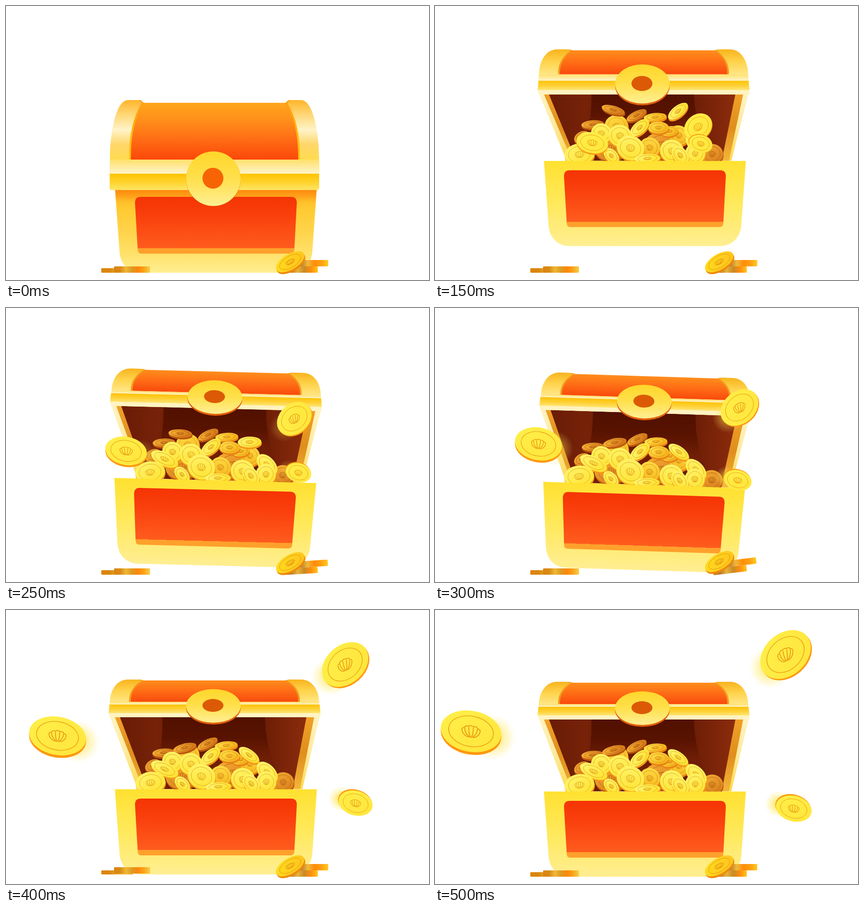
An HTML page with a canvas that plays this animation: 928x603 px, repeating every 1500 ms.

```html
<!DOCTYPE html>
<html lang="en">
<head>
<meta charset="utf-8">
<title>Treasure chest</title>
<style>
html, body { margin: 0; width: 100%; height: 100%; overflow: hidden; background: #fff; }
canvas { display: block; }
</style>
</head>
<body>
<canvas id="stage" width="928" height="603"></canvas>
<script>
const ctx = document.getElementById('stage').getContext('2d');
const LOOP = 1500;

// The picture holds for 100 ms, then advances every 50 ms up to step 9.
const KEYS = [0, 1, 2, 3, 5, 7, 9];
let step = 0;

function at(track) {
  if (typeof track === 'number') return track;
  let i = 0;
  while (i < KEYS.length - 2 && KEYS[i + 1] <= step) i++;
  const u = (step - KEYS[i]) / (KEYS[i + 1] - KEYS[i]);
  return track[i] + (track[i + 1] - track[i]) * u;
}

const CHEST = { dy: [0, -69.5, -58.5, -30, -10, -5, 0], rot: [0, -2.07, 0, 1.1, 1.8, 0, 0] };
const LID = {
  top: [207, 159, 154, 158, 158, 158, 158],
  panel: [338, 228, 209, 207, 207, 207, 207],
  gold: [369, 242, 223, 213, 213, 213, 213],
  lip: [405, 266, 243.5, 232, 232, 232, 232],
  inner: [405, 274, 253, 241, 241, 241, 241],
  badgeY: [380, 255, 230, 216, 216, 216, 216],
  badgeR: [60, 50, 43, 37, 37, 37, 37]
};
const HOP_RIGHT = [0, 0, 0, 0, 1, 0, 0];
const HOP_LEFT = [0, 0, 0, 0, 0, 1, 0];

const BRIGHT = ['#fff368', '#ffe333', '#dfa01c', '#f6971a'];
const MID = ['#ffdd45', '#f5b41c', '#d98a14', '#ec8415'];
const DARK = ['#f3a930', '#d67c1c', '#b4600f', '#bd580c'];
const GROUND = ['#ffd91c', '#ffc61e', '#e08d10', '#f08a0c'];
const FLYING = ['#ffee48', '#ffe63c', '#e99a14', '#ff980e'];

// x, y, rx, ry, rotation, tone
const PILE = [
  [398, 323, 26, 25, 0, MID],
  [346, 319, 25, 9, -4, DARK],
  [[392, 390, 391, 369, 393, 392, 392], [308, 300, 287, 288, 308, 308, 308], 26, 9,
    [0, 17, 15, 17, -13, -14, -14], DARK],
  [442, 299, 24, 9, -27, DARK],
  [483, 303, 25, 9, -5, MID],
  [385, 372, 35, 28, 0, DARK],
  [500, 365, 42, 30, 0, DARK],
  [322, 347, 18, 12, -30, DARK],
  [535, 343, 23, 21, 40, MID],
  [515, 334, 19, 11, -10, MID],
  [490, 326, 23, 13, 0, MID],
  [[533, 532, 533, 533, 534, 533, 533], [324, 310, 290, 302, 324, 324, 324], 26, 12,
    [0, -38, -38, -38, 33, 35, 35], BRIGHT],
  [608, 384, 24, 22, 0, DARK],
  [365, 339, 23, 22, 30, BRIGHT],
  [348, 355, 32, 15, 24, BRIGHT],
  [449, 326, 25, 13, -40, BRIGHT],
  [406, 344, 26, 24, 20, BRIGHT],
  [471, 370, 23, 22, 30, MID],
  [573, 362, 28, 17, 45, BRIGHT],
  [317, 385, 33, 24, -8, BRIGHT],
  [387, 388, 20, 13, 45, BRIGHT],
  [429, 371, 31, 27, 25, BRIGHT],
  [520, 378, 27, 25, 30, BRIGHT],
  [571, 383, 22, 23, 0, BRIGHT],
  [538, 387, 23, 16, 50, BRIGHT],
  [466, 394, 28, 10, -3, BRIGHT]
];

const FLYERS = [
  { x: [552, 552, 577, 597, 668, 744, 769], y: [278, 277, 266, 268, 219, 120, 98],
    rx: [30, 30, 33, 38, 46, 57, 62], ry: [25, 25, 27, 30, 35, 42, 46],
    rot: -42, rim: [.04, .05], glow: [-.55, .62] },
  { x: [369, 369, 345, 300, 227, 113, 79], y: [301, 301, 301, 330, 299, 277, 267],
    rx: [34, 34, 35, 40, 52, 63, 67], ry: [22, 22, 23, 26, 36, 42, 45],
    rot: 11, rim: [0, .09], glow: [.72, .3] },
  { x: [570, 570, 583, 619, 664, 767, 787], y: [310, 310, 303, 346, 379, 425, 437],
    rx: [24, 24, 26, 26, 31, 38, 40], ry: [20, 20, 19, 20, 22, 27, 28],
    rot: 16, rim: [-.03, -.07], glow: [-.85, -.35] }
];

function grad(x0, y0, x1, y1, colors) {
  const g = ctx.createLinearGradient(x0, y0, x1, y1);
  colors.forEach((c, i) => g.addColorStop(i / (colors.length - 1), c));
  return g;
}
const down = (y0, y1, ...colors) => grad(0, y0, 0, y1, colors);
const across = (x0, x1, ...colors) => grad(x0, 0, x1, 0, colors);

function fill(path, color) {
  ctx.fillStyle = color;
  ctx.fill(new Path2D(path));
}

function poly(color, ...p) {
  fill('M' + p.join(' ') + 'Z', color);
}

function oval(x, y, rx, ry, color, rot = 0) {
  ctx.fillStyle = color;
  ctx.beginPath();
  ctx.ellipse(x, y, rx, ry, rot, 0, 7);
  ctx.fill();
}

function bar(x, y, w, h, color, r = 2) {
  ctx.fillStyle = color;
  ctx.beginPath();
  ctx.roundRect(x, y, w, h, r);
  ctx.fill();
}

function inSpace(x, y, deg, draw) {
  ctx.save();
  ctx.translate(x, y);
  ctx.rotate(deg * Math.PI / 180);
  draw();
  ctx.restore();
}

// Scallop outline with ribs, inside a unit circle.
function shellPath() {
  const edge = i => {
    const a = Math.PI * (1.08 + i * .168);
    return [.31 * Math.cos(a), .06 + .31 * Math.sin(a)];
  };
  ctx.moveTo(-.11, .28);
  ctx.quadraticCurveTo(-.27, .2, ...edge(0));
  for (let i = 1; i <= 5; i++) {
    const [ax, ay] = edge(i - .5);
    ctx.quadraticCurveTo(ax * 1.2, ay * 1.25, ...edge(i));
  }
  ctx.quadraticCurveTo(.27, .2, .11, .28);
  ctx.closePath();
  for (let i = 1; i < 5; i++) {
    const [x, y] = edge(i);
    ctx.moveTo(x * .3, .26);
    ctx.quadraticCurveTo(x * .95, .1, x * .95, y * .85);
  }
}

function coin(x, y, rx, ry, rot, [light, shade, line, edge], rimX = 1, rimY = 4) {
  const angle = rot * Math.PI / 180;
  for (const u of [1, .5]) oval(x + rimX * u, y + rimY * u, rx, ry, edge, angle);
  inSpace(x, y, rot, () => {
    oval(0, 0, rx, ry, grad(-rx * .5, -ry, rx * .5, ry, [light, shade]));
    ctx.strokeStyle = line;
    ctx.lineWidth = Math.max(.8, rx / 46);
    ctx.beginPath();
    ctx.ellipse(0, 0, rx * .74, ry * .74, 0, 0, 7);
    ctx.stroke();
    ctx.save();
    ctx.beginPath();
    ctx.scale(rx, ry);
    ctx.rotate(-angle * .6);
    shellPath();
    ctx.restore();
    ctx.lineWidth = Math.max(1, rx / 34);
    ctx.stroke();
  });
}

function drawInside(lip, inner) {
  poly(down(lip, 399, '#fff4c4', '#ffeaa0', '#ffd84a'), 225, lip, 690, lip, 650, 399, 289, 399);
  poly(down(inner, 399, '#f0a028', '#e08e1c', '#f3b53a'), 239, inner, 676, inner, 645, 399, 301, 399);
  ctx.save();
  ctx.clip(new Path2D(`M250 ${inner}L659 ${inner}L629 399L310 399Z`));
  ctx.fillStyle = across(250, 659, '#6a1c06', '#762208', '#5c1503', '#5c1503', '#701f07', '#8c2c0c');
  ctx.fillRect(240, inner, 430, 399 - inner);
  fill(`M343 ${inner}L568 ${inner}Q570 310 595 360L330 360Q345 300 343 ${inner}Z`,
    down(inner, 330, '#521000', '#581300', '#701e06'));
  ctx.restore();
}

function drawLid(closed, top, panel, gold, lip, inner) {
  const h = panel - top;
  const notch = closed ? 6 : 2;
  const cap = `M228 ${panel}C228 ${panel - h * .42} 240 ${top} 268 ${top}L291 ${top}` +
    `L298 ${top + notch}Q269 ${top + h * .4} 270 ${panel}Z`;
  ctx.fillStyle = closed ? down(top, panel, '#ffa91c', '#ff8f1a', '#ff6c14', '#fb470a')
                         : down(top, panel, '#ff8f1c', '#ff6e16', '#f94a0c');
  ctx.fillRect(272, top + notch, 371, h - notch);
  const capColor = closed
    ? down(top, panel, '#ffb52a', '#ffd878', '#fff3c8', '#ffd668', '#ffdc50')
    : down(top, panel, '#f8b41e', '#ffd34c', '#ffe684');
  for (const side of [1, -1]) {
    ctx.save();
    if (side < 0) {
      ctx.translate(915, 0);
      ctx.scale(-1, 1);
    }
    ctx.save();
    ctx.translate(4, 0);
    ctx.clip(new Path2D(`M250 ${top}L300 ${top}L300 ${panel}L250 ${panel}Z`));
    fill(cap, closed ? down(top, panel, '#ff9a10', '#ffb60c', '#ffc410') : '#f39a1c');
    ctx.restore();
    fill(cap, capColor);
    ctx.restore();
  }
  poly(down(panel, gold, '#ffe06a', '#fff4cc'), 228, panel, 687, panel, 688, gold, 227, gold);
  if (closed) {
    bar(227.5, gold, 459.5, lip - gold, down(gold, lip, '#fdc400', '#ffd22a', '#ffe566'), [0, 0, 4, 4]);
  } else {
    poly(down(gold, lip, '#fcc308', '#ffd034', '#ffe574'), 227, gold, 688, gold, 690, lip, 225, lip);
    poly('#fff3c2', 225, lip, 690, lip, 689, inner, 228, inner);
  }
}

function drawBody(closed) {
  fill('M239 399.5L682 399.5L672 540C670 570 650 587 624 587L297 587C270 587 251 570 249 540Z',
    closed ? down(405, 587, '#ffb41e', '#ffcb34', '#ffd34a', '#ffe066', '#ffee92')
           : down(399, 587, '#ffe130', '#ffe95c', '#ffee92'));
  if (closed) poly(down(405, 434, '#ff8a0c', '#ff9c1acc', '#ffb41e00'), 239.5, 405, 681.5, 405, 679, 434, 241.5, 434);
  const red = ctx.createLinearGradient(0, 420, 0, 545);
  [[0, '#f53404'], [.3, '#f93e0c'], [.905, '#ff5c1e'], [.905, '#ffa02c'], [1, '#ffa02c']]
    .forEach(s => red.addColorStop(...s));
  fill('M296 420L625 420Q638 420 638 433L632.5 537Q632 545 624 545L297 545Q289.5 545 289 537L283 433Q283 420 296 420Z', red);
}

function drawBadge(closed, y, r) {
  oval(455, y + (closed ? 1 : 4), 60, r, closed ? '#dc6008' : '#e2600c');
  oval(455, y, 60, r, down(y - r, y + r, '#ffd62a', '#ffe04c', '#ffef94'));
  oval(454, y - 1, 23, 23 * r / 60, closed ? '#f76406' : '#dc5a06');
}

function drawChest() {
  const closed = step === 0;
  const [top, panel, gold, lip, inner, badgeY, badgeR] = Object.values(LID).map(at);
  inSpace(458, 350 + at(CHEST.dy), at(CHEST.rot), () => {
    ctx.translate(-458, -350);
    if (closed) {
      drawBody(closed);
    } else {
      drawInside(lip, inner);
      for (const [x, y, rx, ry, rot, tone] of PILE) coin(at(x), at(y), rx, ry, at(rot), tone);
    }
    drawLid(closed, top, panel, gold, lip, inner);
    drawBadge(closed, badgeY, badgeR);
    if (!closed) drawBody(closed);
  });
}

function drawGround() {
  const left = at(HOP_LEFT);
  const right = at(HOP_RIGHT);
  bar(209, 577 - 4 * left, 70, 10 - left, across(209, 279, '#e08408', '#d8860f', '#e8a828', '#f4bc30', '#ffa51c'));
  bar(237, 573 - 7 * left, 79, 14,
    across(237, 316, '#dc8410', '#d88a18', '#f0b834', '#dd9a24', '#ff8608', '#f9a41c', '#f6cf48'));
  inSpace(620, 580, -7 * right, () => {
    bar(-10, -7, 74, 14, across(-10, 64, '#d98a14', '#b8782c', '#e8b43c', '#c98a26', '#ff8e0c', '#ffc51c'));
    bar(12, -21, 75, 14, across(12, 87, '#d08a1c', '#b97c30', '#efb93a', '#ff8c0a', '#ffa010', '#ffcb22'));
  });
  coin(623.5, 563 - 5 * right, 35, 17, -31, GROUND, 2, 4);
}

function drawFlyers() {
  const glow = at([0, 0, 0, .1, .7, 1, 1]);
  for (const f of FLYERS) {
    const [x, y, rx, ry] = [f.x, f.y, f.rx, f.ry].map(at);
    const gx = x + f.glow[0] * rx, gy = y + f.glow[1] * ry, r = rx * .75;
    const g = ctx.createRadialGradient(gx, gy, 0, gx, gy, r);
    g.addColorStop(0, `rgba(255,225,50,${.9 * glow})`);
    g.addColorStop(.5, `rgba(255,230,80,${.45 * glow})`);
    g.addColorStop(1, 'rgba(255,235,120,0)');
    oval(gx, gy, r, r, g);
    coin(x, y, rx, ry, f.rot, FLYING, f.rim[0] * rx, f.rim[1] * rx);
  }
}

function frame(now) {
  const t = now % LOOP;
  step = t < 100 ? 0 : Math.min(9, Math.floor((t - 50) / 50));
  ctx.fillStyle = '#fff';
  ctx.fillRect(0, 0, 928, 603);
  drawChest();
  drawGround();
  if (step > 0) drawFlyers();
  requestAnimationFrame(frame);
}

const start = performance.now();
(function run() {
  frameLoop(performance.now());
})();

function frameLoop(now) {
  frame(Math.max(0, now - start));
}
</script>
</body>
</html>
```
